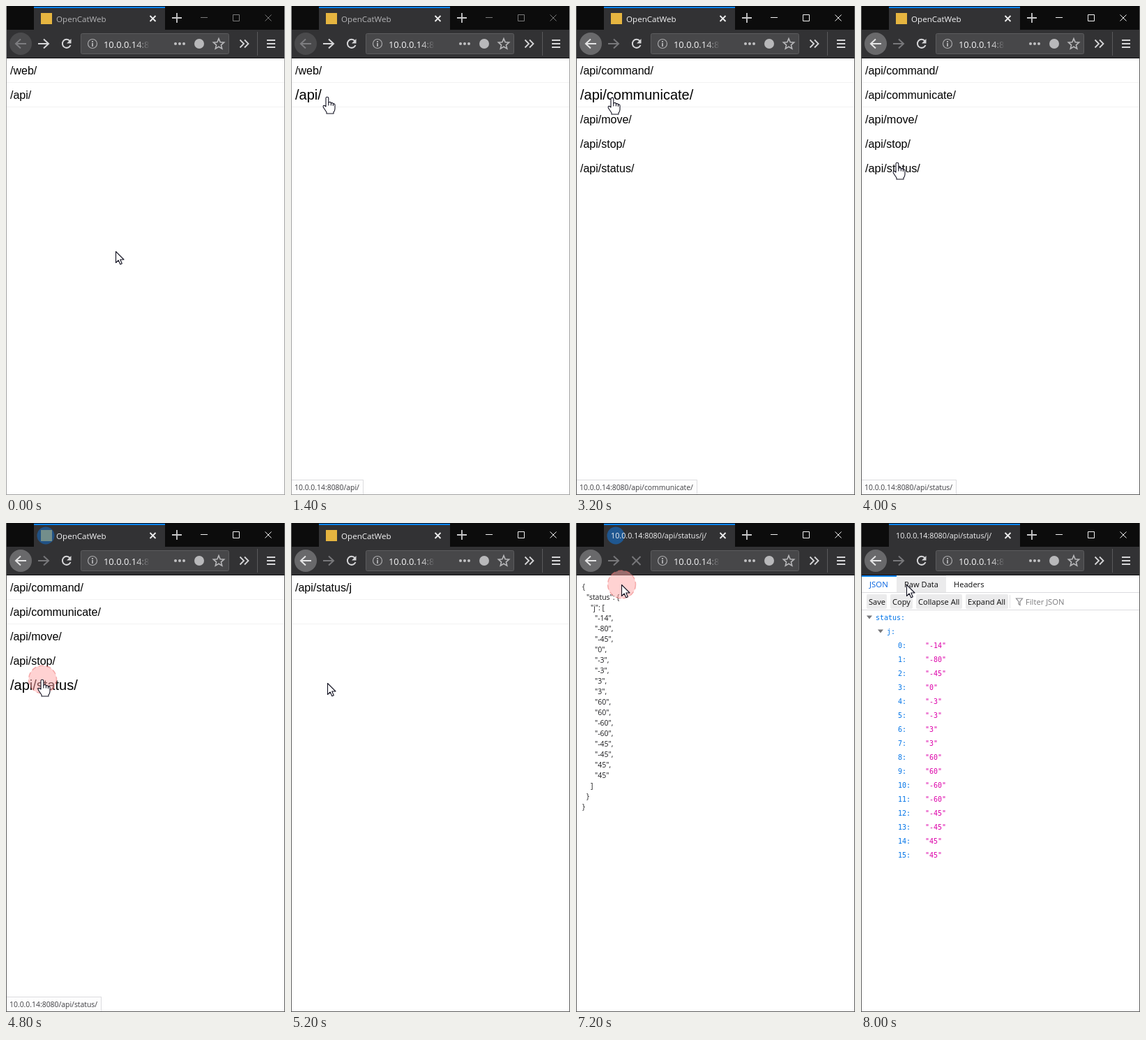
An HTML page with a canvas that plays this animation: 400x700 px, repeating every 8.2 s.

```html
<!DOCTYPE html>
<html lang="en">
<head>
<meta charset="utf-8">
<title>OpenCatWeb</title>
<style>
html, body { margin: 0; width: 100%; height: 100%; overflow: hidden; background: #fff; }
canvas { display: block; width: 400px; height: 700px; }
</style>
</head>
<body>
<canvas id="stage" width="400" height="700"></canvas>
<script>
const ctx = document.getElementById('stage').getContext('2d', { alpha: false });
const LOOP = 8200, STEP = 200;
const UI = '"Open Sans", "Noto Sans", sans-serif';
const PAGE = '"Liberation Sans", Arial, sans-serif';
const MONO = '"DejaVu Sans Mono", "Liberation Mono", monospace';
const HOST = '10.0.0.14:8080';

const JOINTS = [-14, -80, -45, 0, -3, -3, 3, 3, 60, 60, -60, -60, -45, -45, 45, 45];

// pages: start time and links
const PAGES = [
  { at: 0, links: ['/web/', '/api/'] },
  { at: 2400, links: ['/api/command/', '/api/communicate/', '/api/move/', '/api/stop/', '/api/status/'] },
  { at: 5000, links: ['/api/status/j'] }
];
// link hovers: page, row, start, end
const HOVERS = [
  [0, 1, 750, 2400], [1, 1, 2400, 3500], [1, 2, 3500, 3700],
  [1, 4, 3930, 5000], [2, 0, 6100, 7200]
];
// status line: start, end, path
const STATUS = [
  [1200, 2400, '/api/'], [2800, 3600, '/api/communicate/'], [3600, 3800, '/api/move/'],
  [4000, 5000, '/api/status/'], [6400, 7200, '/api/status/j/']
];
// pointer path: time, x, y
const TRACK = [
  [0, 157, 351], [200, 153, 338], [400, 125, 270], [600, 82, 180], [800, 57, 139],
  [1000, 52, 130], [3000, 52, 130], [3200, 52, 131], [3400, 52, 138], [3600, 52, 152],
  [3800, 52, 196], [4000, 52, 224], [4800, 52, 224], [5000, 52, 227], [5200, 52, 229],
  [5400, 52, 229], [5600, 53, 221], [5800, 57, 180], [6000, 62, 124], [6200, 65, 98],
  [6400, 65, 88], [8200, 65, 88]
];
const HANDS = [[800, 3600], [3600, 5000], [6200, 7200]];
const CLICKS = [2200, 4800, 7000];

const clamp = v => Math.max(0, Math.min(1, v));
const ease = v => { v = clamp(v); return v * v * (3 - 2 * v); };
const within = (t, a, b) => t >= a && t < b;

function rect(x, y, w, h, color) {
  ctx.fillStyle = color;
  ctx.fillRect(x, y, w, h);
}
function box(x, y, w, h, r, fill, edge) {
  ctx.beginPath();
  ctx.roundRect(x, y, w, h, r);
  ctx.fillStyle = fill;
  ctx.fill();
  if (edge) { ctx.strokeStyle = edge; ctx.lineWidth = 1; ctx.stroke(); }
}
function disc(x, y, r, color) {
  ctx.beginPath();
  ctx.arc(x, y, r, 0, Math.PI * 2);
  ctx.fillStyle = color;
  ctx.fill();
}
function line(path, color, width = 1) {
  ctx.strokeStyle = color;
  ctx.lineWidth = width;
  ctx.stroke(new Path2D(path));
}
function text(s, x, y, size, color, font = UI) {
  ctx.font = `${size}px ${font}`;
  ctx.fillStyle = color;
  ctx.fillText(s, x, y);
}

function drawTitleBar(t, active, json) {
  rect(0, 0, 400, 34, '#0c0c0c');
  rect(40, 1, 188, 33, '#323234');
  rect(40, 1, 188, 2, '#0a84ff');
  const burst = within(t, 2400, 2800) || within(t, 4800, 5200) || within(t, 7200, 7400);
  if (!json) rect(50, 10, 16, 16, '#e6b540');
  if (burst) disc(57, 18, 12.5, json ? '#1f5790' : 'rgba(20,110,200,.55)');
  const ink = active ? '#f4f4f5' : '#b4b4b6';
  if (json) text(HOST + '/api/status/j/', 50, 22, 10.75, ink);
  else text('OpenCatWeb', 72, 23, 11.6, ink);
  line('M206.5 14 l8 8 m0 -8 l-8 8', '#f0f0f0', 1.8);
  line('M245 10 v14 M238 17 h14', '#c9c9ca', 1.8);
  const knob = active ? '#f2f2f2' : '#7a7a7a';
  line('M279 16.5 h10 M325.5 12.5 h9 v9 h-9 z M371.5 12.5 l9 9 m0 -9 l-9 9', knob);
}

function drawToolbar(t, moved) {
  const on = '#d6d6d8', off = '#77777a';
  rect(0, 34, 400, 41, '#323234');
  rect(0, 74, 400, 1, '#0c0c0d');
  disc(21, 54, 16, moved ? '#69696b' : '#4a4a4c');
  line('M29 54 h-15 m7 -6.5 l-7 6.5 l7 6.5', moved ? '#e4e4e5' : '#7d7d80', 2);
  line('M46 54 h15 m-7 -6.5 l7 6.5 l-7 6.5', moved ? off : on, 2);
  if (within(t, 7200, 7600)) {
    line('M80.5 48 l12 12 m0 -12 l-12 12', off, 2);
  } else {
    line('M91.5 50 A6 6 0 1 0 92.5 56', on, 2);
    ctx.fillStyle = on;
    ctx.fill(new Path2D('M93.5 47 v6.5 h-6.5 z'));
  }
  box(107.5, 39.5, 212, 29, 2, '#474749', '#5c5c5e');
  line('M130.5 54 a6.5 6.5 0 1 0 -13 0 a6.5 6.5 0 1 0 13 0', '#aaaaac', 1.2);
  rect(123, 53, 2, 5, '#aaaaac');
  rect(123, 50, 2, 2, '#aaaaac');
  const fade = ctx.createLinearGradient(186, 0, 206, 0);
  fade.addColorStop(0, '#f4f4f5');
  fade.addColorStop(1, 'rgba(244,244,245,0)');
  text(HOST, 140, 60, 12.9, fade);
  for (let i = 0; i < 3; i++) disc(243 + i * 6, 54, 2, '#c0c0c2');
  disc(277, 54, 7, '#b8b8ba');
  ctx.beginPath();
  for (let i = 0; i < 10; i++) {
    const r = i % 2 ? 3.6 : 8, a = i * Math.PI / 5 - Math.PI / 2;
    ctx.lineTo(305 + r * Math.cos(a), 54.7 + r * Math.sin(a));
  }
  ctx.closePath();
  ctx.strokeStyle = '#b8b8ba';
  ctx.lineWidth = 1.6;
  ctx.stroke();
  line('M335.5 48.5 l5.5 5.5 l-5.5 5.5 M342 48.5 l5.5 5.5 l-5.5 5.5', on, 1.8);
  rect(360, 37, 1, 34, '#5a5a5c');
  for (const y of [48, 53, 58]) rect(374, y, 12, 2, on);
}

function grow(page, row, t) {
  let k = 0;
  for (const [p, r, a, b] of HOVERS) {
    if (p === page && r === row && t >= a) {
      k = ease((Math.min(t, b) - a) / 400) * (1 - ease((t - b) / 400));
    }
  }
  return k;
}

function drawLinks(t) {
  let page = 0;
  PAGES.forEach((p, i) => { if (t >= p.at) page = i; });
  rect(1, 109, 398, 1, '#f2f2f2');
  rect(1, 144, 398, 1, '#f2f2f2');
  PAGES[page].links.forEach((s, i) => {
    const size = 16 + 4 * grow(page, i, t);
    text(s, 6, Math.round(92 + 35 * i + size * 0.35), size, '#000', PAGE);
  });
}

function drawRaw() {
  const rows = [[0, '{'], [1, '"status": {'], [2, '"j": [']];
  JOINTS.forEach((v, i) => rows.push([3, `"${v}"` + (i < 15 ? ',' : '')]));
  rows.push([2, ']'], [1, '}'], [0, '}']);
  rows.forEach(([depth, s], i) => text(s, 9 + depth * 6, 95 + i * 15, 10.5, '#1c1c1e'));
}

function twisty(x, y) {
  ctx.fillStyle = '#77777a';
  ctx.fill(new Path2D(`M${x - 4} ${y - 2} h8 l-4 5 z`));
}

function drawViewer() {
  const ink = '#0c0c0d', key = '#0074e8';
  rect(51, 75, 71, 24, '#ebebec');
  rect(1, 75, 50, 2, '#0a84ff');
  text('JSON', 12, 92, 11.4, '#0060df');
  text('Raw Data', 62, 92, 11.1, ink);
  text('Headers', 133, 92, 11.1, ink);
  rect(1, 99, 398, 1, '#dcdcdf');
  const buttons = [['Save', 8, 29, 11], ['Copy', 42, 32, 45], ['Collapse All', 79, 66, 82], ['Expand All', 150, 61, 153]];
  for (const [s, x, w, tx] of buttons) {
    box(x, 102, w, 21, 2, '#ebebec');
    text(s, tx, 117, 11.1, ink);
  }
  rect(213, 103, 1, 19, '#e4e4e6');
  line('M222.5 108 h9 l-3.5 4.5 v5 l-2 -1.5 v-3.5 z', '#8a8a8d', 1.2);
  text('Filter JSON', 236, 117, 11.2, '#7b7b7e');
  rect(1, 124, 398, 1, '#dcdcdf');
  twisty(12, 134.5);
  text('status:', 21, 139, 10, key, MONO);
  twisty(28, 154.5);
  text('j:', 37, 159, 10, key, MONO);
  JOINTS.forEach((v, i) => {
    text(i + ':', 53, 179 + i * 20, 10, key, MONO);
    text(`"${v}"`, 92, 179 + i * 20, 10, '#dd00a9', MONO);
  });
}

function drawStatus(t) {
  const s = STATUS.find(([a, b]) => within(t, a, b));
  if (!s) return;
  const label = HOST + s[2];
  ctx.font = `10.4px ${UI}`;
  const w = Math.round(ctx.measureText(label).width) + 10;
  rect(0, 678, w + 1, 22, '#dcdcdf');
  rect(0, 679, w, 21, '#fdfdfd');
  const fresh = t === 1200 || t === 6400;
  text(label, 5, 693, 10.4, fresh ? '#8a8a8e' : '#3c3c40');
}

function pointerAt(t) {
  const i = Math.max(1, TRACK.findIndex(p => p[0] >= t));
  const [t0, x0, y0] = TRACK[i - 1], [t1, x1, y1] = TRACK[i];
  const k = clamp((t - t0) / (t1 - t0));
  return [Math.round(x0 + (x1 - x0) * k), Math.round(y0 + (y1 - y0) * k)];
}

const ARROW = new Path2D('M.5 .5 V16.5 L4.2 13 L6.8 18.8 L9.3 17.7 L6.8 12 H12 Z');
const HAND = new Path2D('M-2 14 V2 Q-2 .3 -.2 .3 Q1.8 .3 1.8 2 V8 Q5 6.8 5.4 9 Q8 8 8.4 10 Q11 9.4 11 12 V17 Q11 20 9 22 V24 H-1 V22 L-5.7 15 Q-6.3 11.6 -3.8 12.5 Z');
const KNUCKLES = new Path2D('M1.8 8 V12.5 M5.4 9 V12.5 M8.4 10 V13');

function drawPointer(t) {
  const [x, y] = pointerAt(t);
  const hand = HANDS.some(([a, b]) => within(t, a, b));
  const click = CLICKS.find(c => within(t, c, c + 400));
  if (click !== undefined) {
    disc(x + .5, y, 20, 'rgba(255,165,165,.5)');
    ctx.beginPath();
    ctx.arc(x + .5, y, 20, 0, Math.PI * 2);
    ctx.setLineDash([7, 4]);
    ctx.strokeStyle = 'rgba(235,110,110,.5)';
    ctx.lineWidth = 1.5;
    ctx.stroke();
    ctx.setLineDash([]);
  }
  ctx.save();
  ctx.translate(x, y);
  ctx.fillStyle = '#fff';
  ctx.strokeStyle = '#111120';
  ctx.lineWidth = 1.1;
  ctx.lineJoin = 'round';
  const shape = hand ? HAND : ARROW;
  ctx.fill(shape);
  ctx.stroke(shape);
  if (hand) ctx.stroke(KNUCKLES);
  ctx.restore();
}

function draw(t) {
  const active = t >= 2200, moved = t >= 2400, json = t >= 7200;
  rect(0, 0, 400, 700, '#fff');
  drawTitleBar(t, active, json);
  drawToolbar(t, moved);
  if (t >= 7600) drawViewer();
  else if (json) drawRaw();
  else drawLinks(t);
  drawStatus(t);
  const edge = active ? '#5e5e5e' : '#a2a2a2';
  rect(0, 0, 1, 700, edge);
  rect(399, 0, 1, 700, edge);
  rect(0, 699, 400, 1, edge);
  drawPointer(t);
}

const start = performance.now();
function tick() {
  const t = (performance.now() - start) % LOOP;
  draw(Math.floor(t / STEP) * STEP);
  requestAnimationFrame(tick);
}
tick();
</script>
</body>
</html>
```
